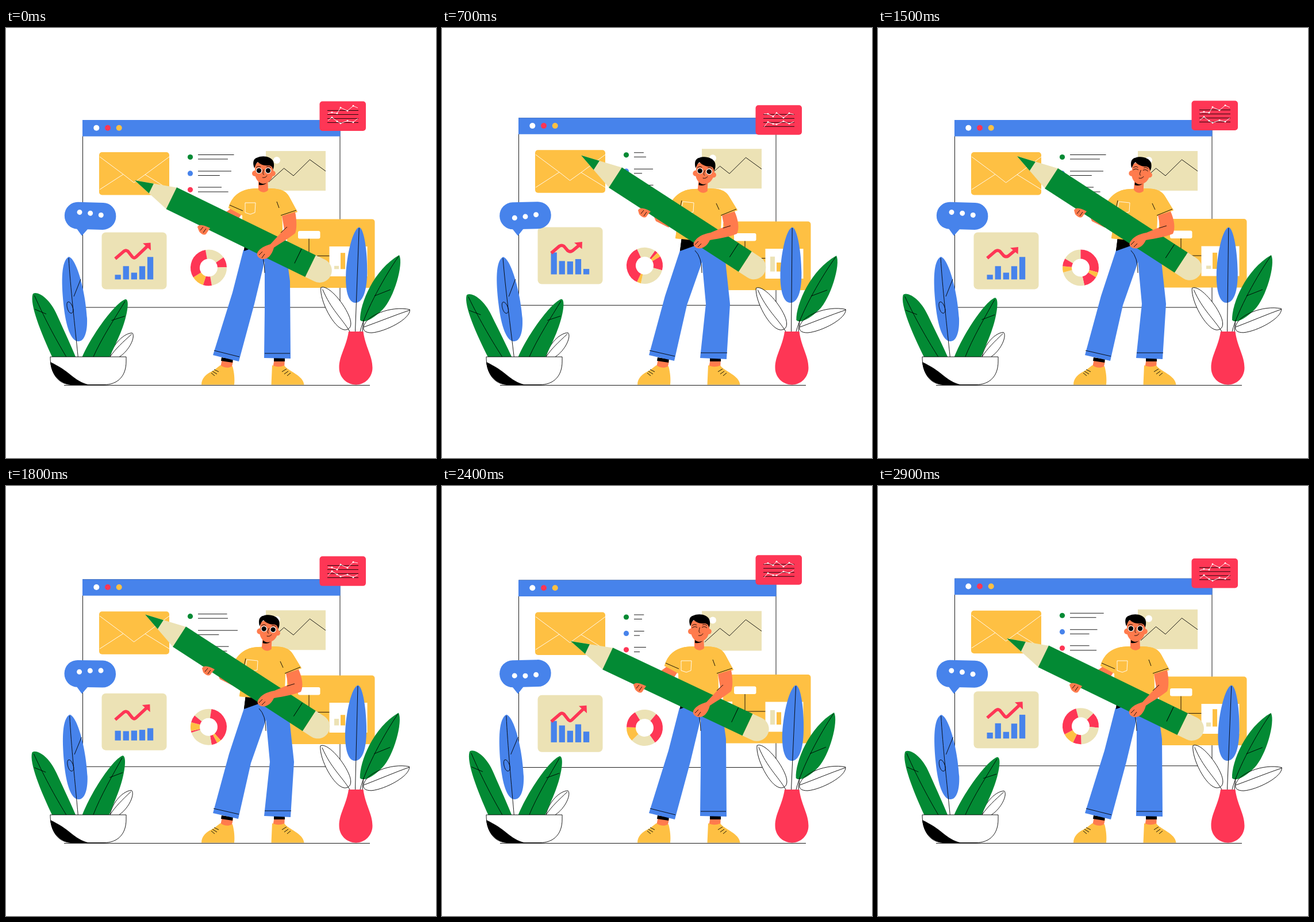
An HTML page with a canvas for the animation above (3000 ms loop, 748 by 748 pixels).

```html
<!DOCTYPE html>
<html lang="en">
<head>
<meta charset="utf-8">
<title>Man with a giant pencil</title>
<style>
html, body { margin: 0; width: 100%; height: 100%; overflow: hidden; background: #fff; }
canvas { display: block; }
</style>
</head>
<body>
<canvas id="stage" width="748" height="748"></canvas>
<script>
const ctx = document.getElementById('stage').getContext('2d');
const BLUE = '#4783eb', GREEN = '#038a34', YELLOW = '#fec043', PINK = '#fe3655',
  CREAM = '#ece2b5', SKIN = '#ff7b4d', BLACK = '#000', WHITE = '#fff';
const LOOP = 3000, STEP = 100;
let t = 0;

// Timing helpers
const wave = (period, peak) => Math.cos(2 * Math.PI * (t - peak) / period);
const slow = peak => wave(LOOP, peak);
const fast = peak => wave(LOOP / 2, peak);
const ramp = (from, to) => {
  const x = Math.min(1, Math.max(0, (t - from) / (to - from)));
  return x * x * (3 - 2 * x);
};
const lerp = (a, b, p) => a + (b - a) * p;

// Blends two path strings that share the same structure
const NUM = /-?\d+(\.\d+)?/g;
function mix(a, b, p) {
  const to = b.match(NUM);
  let i = 0;
  return a.replace(NUM, v => lerp(+v, +to[i++], p).toFixed(2));
}

// Drawing helpers
function shape(d, color) {
  ctx.fillStyle = color;
  ctx.fill(new Path2D(d));
}
function line(d, color = BLACK, width = .9) {
  ctx.strokeStyle = color;
  ctx.lineWidth = width;
  ctx.stroke(new Path2D(d));
}
function box(x, y, w, h, color, r = 0) {
  ctx.fillStyle = color;
  ctx.beginPath();
  ctx.roundRect(x, y, w, h, r);
  ctx.fill();
}
function dot(x, y, r, color) {
  ctx.fillStyle = color;
  ctx.beginPath();
  ctx.arc(x, y, r, 0, 7);
  ctx.fill();
}
function group(x, y, degrees, draw) {
  ctx.save();
  ctx.translate(x, y);
  ctx.rotate(degrees * Math.PI / 180);
  draw();
  ctx.restore();
}
const lift = (dy, draw) => group(0, dy, 0, draw);
const swing = (x, y, degrees, draw) =>
  group(x, y, degrees, () => { ctx.translate(-x, -y); draw(); });

// Sector edges: time, cream, red, yellow, red, cream, red, yellow, red
const donutKeys = [
  [0, -10, 55, 88, 88, 88, 170, 198, 238],
  [700, -25, 35, 45, 60, 105, 192, 192, 205],
  [1100, -25, 30, 85, 100, 130, 222, 228, 265],
  [1500, -60, 0, 105, 122, 168, 255, 255, 275],
  [2000, -45, 15, 160, 172, 172, 250, 258, 292],
  [2400, -32, 40, 145, 145, 145, 225, 225, 272],
  [2900, -15, 45, 95, 95, 95, 178, 205, 243],
];
function donut() {
  const i = donutKeys.findLastIndex(k => k[0] <= t);
  const a = donutKeys[i], b = donutKeys[i + 1] || donutKeys[0];
  const p = (t - a[0]) / ((b[0] || LOOP) - a[0]);
  const edges = a.slice(1).map((v, j) => lerp(v, b[j + 1], p));
  const rad = deg => (deg - 90) * Math.PI / 180;
  ctx.lineWidth = 16;
  edges.forEach((from, j) => {
    const to = j < 7 ? edges[j + 1] : edges[0] + 360;
    if (to - from < .2) return;
    ctx.strokeStyle = [CREAM, PINK, YELLOW, PINK][j % 4];
    ctx.beginPath();
    ctx.arc(352.5, 417, 23.5, rad(from), rad(to));
    ctx.stroke();
  });
}

// Rows of text: y, mean length, swing, time of the longest state
const textRows = [
  [220.5, 39, 24, 45], [228, 35, 21, 150], [249, 43, 27, 235],
  [256.5, 25, 15, 130], [277, 35.5, 18, 300], [285, 33, 23, 130],
];
function browser() {
  line('M133.500 160.500H581V486H133.500Z');
  box(133, 160, 448.5, 28.5, BLUE);
  [WHITE, PINK, YELLOW].forEach((c, i) => dot(157.3 + 19.7 * i, 173.8, 5, c));

  box(162, 216, 122, 74.5, YELLOW, 5);
  line('M163 224L204 254.500L222.500 269L242 255L284 224M163 281L204 254.500M284 281L242 255', WHITE);

  [GREEN, BLUE, PINK].forEach((c, i) => dot(320.5, 224.5 + 28.4 * i, 4.6, c));
  for (const [y, mean, amp, peak] of textRows)
    line(`M334 ${y}h${mean + amp * fast(peak)}`);

  box(452, 214, 104, 69, CREAM);
  dot(471, 230, 6, WHITE);
  line('M457 268L483.500 244L500 257L528.500 229L556 249');
  donut();
}

function zigzag(heights, phase) {
  const xs = [560, 567, 576, 582, 594, 604, 612];
  const points = heights.map((y, i) => [xs[i], y + 3 * fast(phase + i * 150)]);
  line('M' + points.join('L'), WHITE);
  points.slice(1, 6).forEach(([x, y]) => dot(x, y, 1.4, WHITE));
}
function alertCard() {
  box(545.5, 0, 80.5, 51.5, PINK, 5);
  for (let y = 16; y < 40; y += 7) line(`M559 ${y}h54`);
  zigzag([18, 17, 20, 12, 19, 11, 14], 0);
  zigzag([36, 29, 34, 36, 31, 34, 29], 900);
}

function planCard() {
  box(489, 0, 152.5, 119.5, YELLOW, 5);
  line('M527 30V64M500 64H563');
  box(508, 20.5, 38.5, 13.5, WHITE, 3);
  box(480, 47, 25, 20, WHITE);
  box(562.5, 47.5, 66, 52, WHITE);
  [[571, 16, -10.5, 30, CREAM], [582, 22.5, 8.5, 1300, YELLOW]].forEach(([x, mean, amp, peak, c]) => {
    const h = mean + amp * fast(peak);
    box(x, 87 - h, 8, h, c);
  });
}

function bubble() {
  swing(132, 361, 1.5 * fast(80), () => {
    box(101, 303, 89.5, 47, BLUE, 23);
    shape('M121 347L132 361.500L144 347Z', BLUE);
    for (let i = 0; i < 3; i++)
      dot(127 + 18.7 * i, 325.5 - 5 * fast(30 + 150 * i), 4.5, WHITE);
  });
}

// Chart bars: mean height, swing, time of the tallest state
const bars = [[23.5, 15.5, 780], [24, 8, 1100], [17, 5.5, 670], [25.5, 7, 1040], [25, 16.5, 1370]];
function chartCard() {
  box(166.5, 0, 113, 99, CREAM, 7);
  bars.forEach(([mean, amp, peak], i) => {
    const h = mean + amp * fast(peak);
    box(189.5 + 14.1 * i, 82 - h, 10.3, h, BLUE);
  });
  const small = ramp(100, 600) - ramp(1500, 1900);
  line(mix('M190 46L205 33C208 31 209 31 212 33L220 43C222 45 224 45 226 43L246 24',
    'M190 45L204 33C207 31 209 31 212 33L219 41C222 43 224 43 227 41L239 31', small), PINK, 5.5);
  shape(mix('M238 19L251.500 18L252 31.500Z', 'M230 27L244 25.500L243.500 38Z', small), PINK);
}

function head() {
  shape('M439 260L455 260L456 282C450 288 443 286 439 281Z', SKIN);
  shape('M440 265L454 269C450 273 445 274 440 273Z', BLACK);
  dot(433, 253, 5, SKIN);
  dot(464, 253, 4.8, SKIN);
  shape('M433 238V255C434 264 441 271 448 271C458 270 464 262 465 252V237C455 230 440 230 433 238Z', SKIN);
  shape('M432 244C428 233 431 227 437 225.500C446 221 461 223 465 232C467 238 466 243 464.500 246C463 241 461 239 456 239C449 240 442 237 438 233C434 236 434 240 432 244Z', BLACK);
  line('M448.500 246C447 251 446 255 449 255M446 260C450 261 453 259 454 256.500M435 243Q439 239 443 242M453 242Q457 239 461 243');
  if (t % 900 >= 600 && t % 900 < 700) {
    line('M435 247Q439 243 444 246M452 246Q457 243 461 247');
  } else {
    for (const x of [440, 456]) {
      dot(x, 248, 5.3, WHITE);
      dot(x, 248, 4.2, BLACK);
    }
  }
}

function legs(p) {
  shape('M376 576L395 580L392 593L373 590Z', SKIN);
  shape('M467 575H485L484 592H464Z', SKIN);
  shape('M375 573L395 576L394 582L374 579Z', BLACK);
  shape('M466 573H485V580H466Z', BLACK);
  shape('M340 620.500C340 609 348 602 362 595L373 586.500C380 592 388 592 394 588C397 599 398 611 397 620.500Z', YELLOW);
  shape('M461.500 620.500L463 586.500C470 590 477 590 484 587C492 598 517 604 518.500 620.500Z', YELLOW);
  line('M362 594L370 598M359 597L367 602M357 600L363 605M488 593L480 598M491 597L484 602M495 600L489 605');
  shape(mix('M413 386L440 380L460 390L450 405L432 480L405 580L360 569L394 460Z',
    'M414 387L440 372L460 386L452 408L426 482L404 579L360 569L388 466Z', p), BLUE);
  shape(mix('M430 386L488 396L494 440L495 575L449 574L450 490L450 404Z',
    'M440 372L492 396L501 480L495 576L449 574L459 480L452 404Z', p), BLUE);
  line(mix('M440 387Q450 398 450 426M362 561L406 572M450 566H494',
    'M440 387Q452 398 452 426M361 561L405 571M450 565H496', p));
}

function torso(p) {
  shape('M417 364L446 372L442 378L414 388Z', BLACK);
  shape(mix('M437 279L457 279C478 279 488 284 493 294L507 320L480 327L482 376L413 368L411 326L387 313C392 295 405 279 437 279Z',
    'M440 280L463 279C484 279 494 283 500 294L514 317L486 327L484 374L406 366L411 330L396 308C402 295 415 280 440 280Z', p), YELLOW);
  line(mix('M416 304L434 304L433 321L425 324L416 321Z', 'M419 302L438 304L437 320L428 322L416 319Z', p), WHITE);
  line(mix('M471 302L475 313M478 326L505 317M389 308L412 318',
    'M477 305L482 316M485 326L512 315M417 300L413 318', p));
}

function pencil(p) {
  const lowTip = t < 1000 ? 265 : 270 - 5 * ramp(2400, LOOP);
  const highTip = 221.5 + (t - 700) / 520;
  const x = lerp(224, 242, p), y = lerp(lowTip, highTip, p);
  const capX = lerp(546, 542, p), capY = lerp(422, highTip + 194.5, p);
  group(x, y, Math.atan2(capY - y, capX - x) * 180 / Math.PI, () => {
    shape('M340 -21H358A21 21 0 0 1 358 21H340Z', CREAM);
    shape('M0 0L72 -21V21Z', CREAM);
    shape('M0 0L32 -9.300V9.300Z', GREEN);
    box(71, -21, 269, 42, GREEN);
    line('M313 -20V8');
  });
}

function person() {
  const lean = ramp(100, 600) - ramp(1800, 2300);
  const hold = ramp(100, 600) - ramp(2000, 2400);
  torso(lean);
  legs(lean);
  shape(mix('M391 314L411 322L395 346L350 345Z', 'M362 312L410 332L394 347L372 336Z', hold), SKIN);
  torso(lean);
  group(7.5 * lean, lean, 0, () => swing(447, 262, 5 * lean, head));
  pencil(hold);
  shape(mix('M333 346C336 340 345 343 355 348L349 357C346 362 340 359 336 354Z',
    'M341 317C344 311 353 313 363 319L357 326C354 332 348 330 343 324Z', hold), SKIN);
  line(mix('M338 352L343 346M343 356L348 349', 'M346 323L351 317M351 327L356 320', hold));
  shape(mix('M480 327L503 320C506 335 506 350 503 357C492 366 478 374 466 382C462 396 455 403 445 402C436 399 435 393 439 388C446 380 452 379 460 376L484 350Z',
    'M487 326L509 319C515 333 518 348 513 358C500 363 484 366 466 369C461 380 452 385 444 383C436 380 436 374 441 369C447 361 457 358 467 356L491 346Z', hold), SKIN);
  line(mix('M489 346L478 356M440 395L446 389M445 400L450 393', 'M502 344L489 348M440 377L446 371M445 381L451 375', hold));
}

function leaf(x, y, degrees, outline, color, ribs) {
  swing(x, y, degrees, () => {
    if (color) shape(outline, color);
    if (!color || color === WHITE) line(outline);
    line(ribs);
  });
}
function leftPlant() {
  leaf(181, 572, .9 * slow(100), 'M181 572C185 550 205 530 219 530C225 536 215 560 197 572', WHITE,
    'M218 532C203 546 190 558 181 572');
  leaf(108, 574, 1.5 * slow(2500), 'M81 574C60 530 40 482 45 464C49 457 73 466 88 500C102 530 114 555 122 574Z', GREEN,
    'M48 466C68 510 90 548 106 574M49 490L69 498');
  leaf(125, 572, slow(2250), 'M109 398C122 400 138 455 141 505C142 530 136 546 125 545C113 544 104 520 100 480C96 440 96 405 109 398Z', BLUE,
    'M109 400C112 450 120 520 125.500 574M118 467L130 437M107 477C111 474 116 483 117 490C117 498 111 498 108 491C106 486 105 480 107 477');
  leaf(151, 574, 1.6 * slow(300), 'M132 574C150 530 190 475 206 470.500C214 472 208 505 198 530C190 550 184 562 179 574Z', GREEN,
    'M205 474C190 500 165 540 151 574M182 508L205 500');
  const pot = 'M77 572H209V580C209 605 195 620.500 170 620.500H115C90 620.500 77 600 77 572Z';
  shape(pot, WHITE);
  shape('M77 581C92 588 101 594 112 603C122 611 132 618 144 620.500H113C94 619 79 604 77 581Z', BLACK);
  line(pot);
}
function rightPlant() {
  leaf(598, 528, .8 * slow(2600), 'M547 452C558 446 585 475 596 500C604 518 598 526 588 525C570 522 545 475 547 452Z', WHITE,
    'M550 455C565 490 584 505 598 528');
  leaf(617, 528, .9 * slow(750), 'M616 508C615 480 640 420 684 395C692 410 675 470 655 490C640 505 622 515 616 508Z', GREEN,
    'M683 397C660 430 626 490 616 528M641 466L669 455');
  leaf(608, 528, 1.2 * slow(2550), 'M612 346.500C621 348 627 390 627 425C627 460 619 478 607 478C595 478 589.500 458 590 430C591 395 601 350 612 346.500Z', BLUE,
    'M612 348L607.500 528');
  leaf(617, 528, .6 * slow(200), 'M622 520C625 500 670 482 702 489C704 505 660 528 636 530C626 530 621 527 622 520Z', null,
    'M702 490C676 499 650 510 623 520M620 528L622 508');
  shape('M596 528H621.500C625 555 637.500 570 637.500 591C637.500 608 624 620.500 609 620.500C593 620.500 579.500 608 579.500 591C579.500 570 592 555 596 528Z', PINK);
}

function render() {
  ctx.fillStyle = WHITE;
  ctx.fillRect(0, 0, 748, 748);
  lift(-3.7 * slow(750), browser);
  lift(127 + 7.3 * slow(720), alertCard);
  lift(332.2 + 4.4 * slow(730), planCard);
  lift(355.4 - 8.9 * slow(750), chartCard);
  bubble();
  line('M101 621.5H633');
  person();
  leftPlant();
  rightPlant();
}

function tick() {
  t = Math.floor(performance.now() % LOOP / STEP) * STEP;
  render();
  requestAnimationFrame(tick);
}
tick();
</script>
</body>
</html>
```
